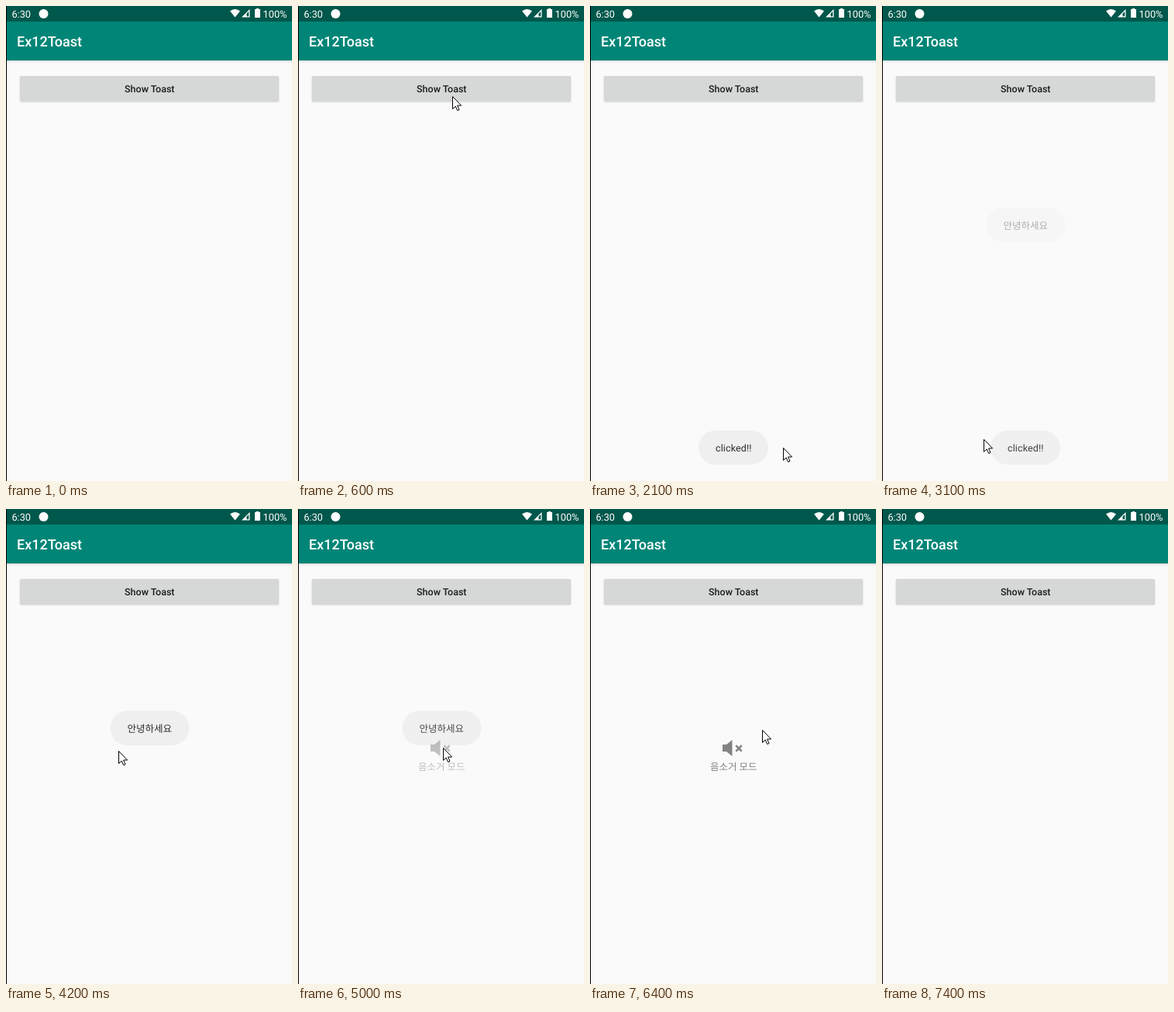
Write an HTML page that moves like this. It is 369x611 px and loops after 8.7 s.

```html
<!DOCTYPE html>
<html lang="ko">
<head>
<meta charset="utf-8">
<title>Toast demo</title>
<style>
  html, body { margin: 0; width: 100%; height: 100%; overflow: hidden; background: #fafafa; }
  svg { display: block; width: 369px; height: 611px; }
  text {
    font: 400 12.5px Roboto, "Noto Sans CJK KR", "Noto Sans CJK", sans-serif;
    fill: #2c2c2c; text-rendering: geometricPrecision;
  }
  .bar { font-size: 12.8px; fill: #fff; }
  .title { font-size: 18px; font-weight: 500; fill: #fff; }
  .label { font-weight: 500; fill: #1c1c1c; }
  .mid { text-anchor: middle; }
  .pill { fill: #efefef; }
  .mute text { fill: #808080; }
</style>
</head>
<body>
<svg viewBox="0 0 369 611">
  <defs>
    <linearGradient id="shade" x2="0" y2="1">
      <stop stop-opacity=".16"/>
      <stop offset=".4" stop-opacity=".05"/>
      <stop offset="1" stop-opacity="0"/>
    </linearGradient>
    <filter id="soft" x="-5%" y="-30%" width="110%" height="160%">
      <feGaussianBlur stdDeviation=".8"/>
    </filter>
  </defs>

  <rect width="369" height="611" fill="#fafafa"/>
  <rect y="70" width="369" height="4" fill="url(#shade)"/>
  <rect y="20" width="369" height="50" fill="#008577"/>
  <rect width="369" height="20" fill="#00574b"/>
  <rect width="1" height="611"/>

  <!-- status bar -->
  <g fill="#fff">
    <text class="bar" x="7.4" y="14.5">6:30</text>
    <circle cx="48.5" cy="10" r="6"/>
    <path d="M289 6.6Q295.5 1.4 302 6.6L295.5 14.6Z"/>
    <path d="M304 14.5L314.5 4V14.5ZM310.5 9.8V13.3H313.2V7.1Z" fill-rule="evenodd"/>
    <path d="M323 4V3H326V4H328V15H321V4Z"/>
    <text class="bar" x="331.5" y="14.5">100%</text>
  </g>
  <text class="title" x="14" y="52">Ex12Toast</text>

  <!-- button -->
  <rect id="lift" x="18" y="91" width="334" height="32.5" rx="2" filter="url(#soft)"/>
  <rect x="18" y="90" width="334" height="33" rx="1.5" fill="#d6d7d7"/>
  <rect id="press" x="18" y="90" width="334" height="33" rx="1.5"/>
  <text class="label mid" x="185.3" y="111">Show Toast</text>

  <!-- toasts -->
  <g class="toast">
    <rect class="pill" x="140" y="546" width="90" height="44" rx="22"/>
    <text class="mid" x="185.3" y="573" letter-spacing=".13">clicked!!</text>
  </g>
  <g class="toast">
    <rect class="pill" x="134.5" y="259.5" width="102" height="44.5" rx="22"/>
    <text class="mid" x="185.2" y="287">안녕하세요</text>
  </g>
  <g class="toast mute">
    <path d="M171 303H176L183.5 297V318L176 312H171Z" fill="#828282"/>
    <path d="M188.3 304.2L195.7 311.6M195.7 304.2L188.3 311.6" stroke="#828282" stroke-width="2.6"/>
    <text class="mid" x="185.2" y="335.6">음소거 모드</text>
  </g>

  <path id="cursor" d="M.5 .5V16.4L4.2 13L6.7 18.5L9 17.5L6.6 12H11.6Z" fill="#fff" stroke="#000"/>
</svg>
<script>
  const LOOP = 8700, STEP = 100, FADE = 500, STAY = 1800, PERIOD = 1860, FIRST = 1140;

  const $ = id => document.getElementById(id);
  const toasts = document.querySelectorAll('.toast');
  const clamp = v => Math.min(1, Math.max(0, v));
  const mix = (a, b, u) => a + (b - a) * u;

  const rest = (from, to, x, y) => ({ from, to, at: () => [x, y] });

  // Clockwise ellipse; a and b are the first and last angle in turns
  const orbit = (from, to, cx, cy, rx, ry, a, b) => ({
    from, to,
    at(u) {
      const angle = mix(a, b, u) * 2 * Math.PI;
      return [cx + rx * Math.cos(angle), cy + ry * Math.sin(angle)];
    }
  });

  // The pointer glides straight from one move to the next
  const moves = [
    rest(300, 300, 320, 125),
    rest(600, 1300, 199, 116),
    orbit(1900, 3100, 191, 559, 60, 33, -.25, 1.51),
    orbit(4200, 4700, 185, 285, 49, 45, .4, 1),
    rest(5000, 5400, 187, 307),
    orbit(5500, 6400, 190, 325, 60, 50, .4, 1.845),
    orbit(6400, 7200, 195, 314, 48, 36, -.155, 1.04),
    rest(7300, 7300, 313, 257)
  ];

  function pointer(t) {
    const i = moves.findLastIndex(m => m.from <= t), m = moves[i], next = moves[i + 1];
    if (!m || (!next && t > m.to)) return null;
    if (t <= m.to) return m.at((t - m.from) / (m.to - m.from || 1));
    const u = (t - m.to) / (next.from - m.to), start = m.at(1), end = next.at(0);
    return start.map((v, k) => mix(v, end[k], u));
  }

  function toastAlpha(t) {
    const rise = clamp(t / FADE), fall = clamp((t - STAY) / FADE);
    return (1 - (1 - rise) ** 2) * (1 - fall ** 2);
  }

  function draw(now) {
    const t = Math.floor(now % LOOP / STEP) * STEP;
    const tip = pointer(t);
    $('cursor').style.display = tip ? '' : 'none';
    if (tip) $('cursor').setAttribute('transform', `translate(${tip.map(Math.round)})`);

    toasts.forEach((el, i) => { el.style.opacity = toastAlpha(t - FIRST - i * PERIOD); });

    const press = clamp((t - 900) / 200) * clamp((1800 - t) / 500);
    $('press').style.opacity = press * .06;
    $('lift').style.opacity = .16 + press * .06;
  }

  function tick() {
    draw(performance.now());
    requestAnimationFrame(tick);
  }
  tick();
</script>
</body>
</html>
```
